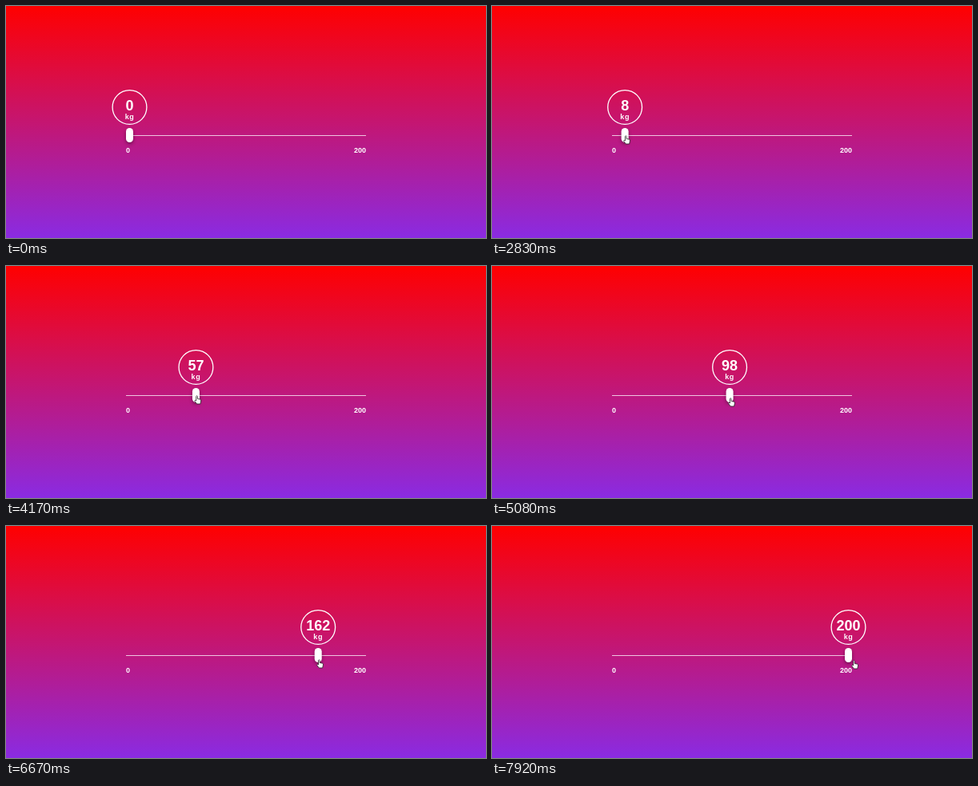
Recreate the animation shown at these times as an HTML page. Size 600x291 px, loop 8000 ms.

```html
<!DOCTYPE html>
<html lang="en">
<head>
<meta charset="utf-8">
<title>Weight slider</title>
<style>
  html, body { margin: 0; height: 100%; overflow: hidden; }
  body { background: linear-gradient(red, blueviolet); }
  svg { display: block; width: 100%; height: 100%; }
  text { font: bold 9px "Liberation Sans", Arial, sans-serif; fill: #fff; }
  #value { font-size: 18px; }
  #unit { letter-spacing: .6px; }
  #thumb rect { filter: drop-shadow(0 2px 2px rgba(0, 0, 0, .4)); }
</style>
</head>
<body>
<svg viewBox="0 0 600 291">
  <rect x="150" y="162" width="300" height="1" fill="#fff" opacity=".75"/>
  <text x="150" y="184">0</text>
  <text x="450" y="184" text-anchor="end">200</text>
  <g id="thumb">
    <circle cy="127" r="21.4" fill="none" stroke="#fff" stroke-width="1.3"/>
    <text id="value" y="131" text-anchor="middle">0</text>
    <text id="unit" y="142" text-anchor="middle">kg</text>
    <rect x="-4.5" y="153" width="9" height="18" rx="4.5" fill="#fff"/>
  </g>
  <path id="hand" fill="#fff" stroke="#222" stroke-width=".8" stroke-linejoin="round"
    d="M-2 1V-4.5Q-1.2-6-.3-4.5V-1.5L3-.8Q4.2-.4 4 1L3.2 5H-1.2L-4 1.3Q-3.8-.2-2 1Z"/>
</svg>
<script>
const LOOP = 8000, STEP = 1000 / 12;
const START = 154.5, PER_KG = 1.455, GRIP = 2.3;
const el = id => document.getElementById(id);

// time, dragged weight, pointer height
const drag = [
  [1900, 0, 168], [2833, 8, 168], [4167, 57, 168], [5083, 98, 171],
  [5833, 138, 173], [6667, 162, 173], [7917, 204, 174]
];
const enter = [[1250, 307, 160], [1900, 0, 168]];

function at(keys, t) {
  if (t <= keys[0][0]) return keys[0].slice(1);
  for (let i = 1; i < keys.length; i++) {
    const a = keys[i - 1], b = keys[i];
    if (t <= b[0]) {
      const k = (t - a[0]) / (b[0] - a[0]);
      return [1, 2].map(j => a[j] + (b[j] - a[j]) * k);
    }
  }
  return keys[keys.length - 1].slice(1);
}

function draw(now) {
  const t = Math.floor((now % LOOP + 4) / STEP) * STEP;
  const kg = Math.min(200, Math.round(at(drag, t)[0]));
  const [x, y] = at(t < 1900 ? enter : drag, t);
  el("value").textContent = kg;
  el("thumb").setAttribute("transform", `translate(${START + kg * PER_KG})`);
  el("hand").setAttribute("transform", `translate(${START + x * PER_KG + GRIP} ${y})`);
  el("hand").setAttribute("visibility", t < 1245 ? "hidden" : "visible");
}

const begin = performance.now();
function tick() {
  draw(performance.now() - begin);
  requestAnimationFrame(tick);
}
tick();
</script>
</body>
</html>
```
